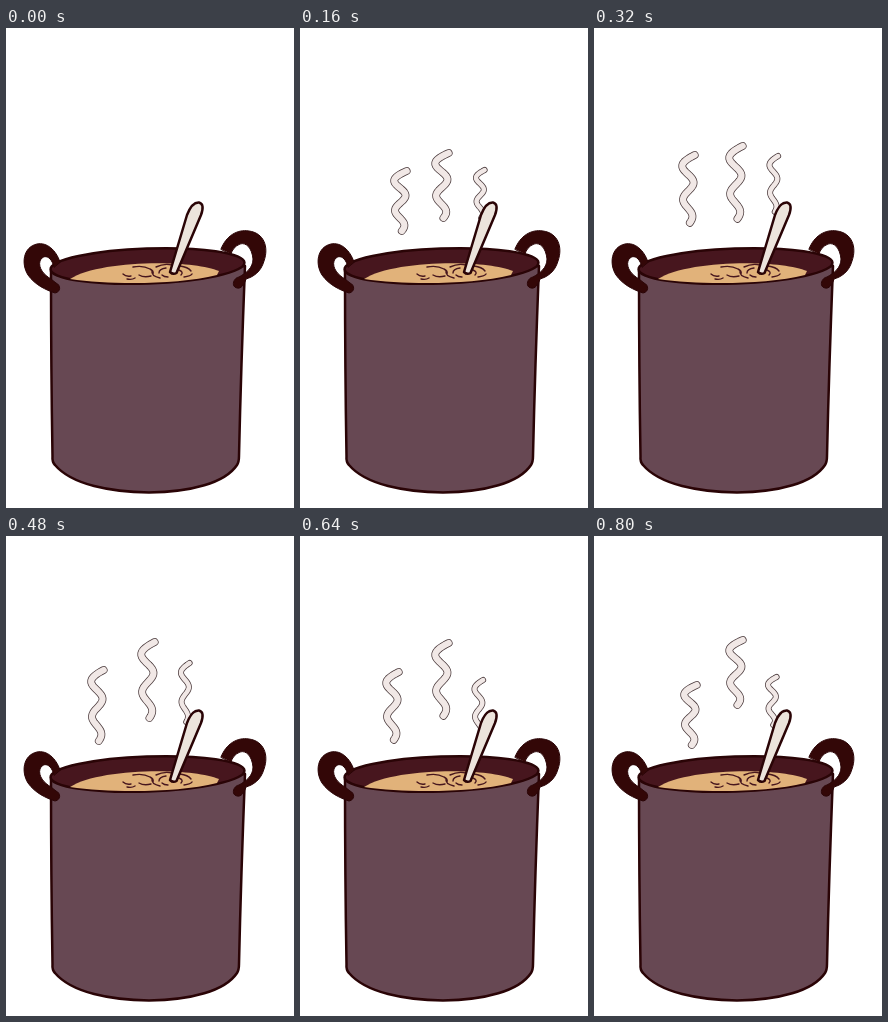
An HTML page for the animation above (0.96 s loop, 288 px wide and 480 px high).

```html
<!DOCTYPE html>
<html lang="en">
<head>
<meta charset="utf-8">
<title>Steaming pot</title>
<style>
  html, body { margin: 0; width: 100%; height: 100%; overflow: hidden; background: #fff; }
  svg { display: block; width: 100vw; height: 100vh; }
  path, ellipse { stroke-linecap: round; stroke-linejoin: round; }
  .line { stroke: #2a0406; stroke-width: 2.5; }
  .dark { fill: #330707; stroke: #2a0406; stroke-width: 1; }
  .swirl { fill: none; stroke: #47161e; stroke-width: 1.4; }
  #steam path { fill: none; }
</style>
</head>
<body>
<svg viewBox="0 0 288 480">
  <g id="steam"></g>

  <path class="line" fill="#674853" d="M45 243 Q45 340 46.500 428 Q46 434 49 437 C66 457 105 464 143 464.500 C185 464 219 455 231 437 Q233 434 233 428 Q235 340 239 238 Z"/>
  <ellipse class="line" fill="#47161e" cx="141.500" cy="238" rx="97" ry="17.500" transform="rotate(-2 141.500 238)"/>
  <path fill="#e1b27a" d="M64 251 C92 232 185 231 213 243 L211 247 C170 257 105 257 64 251 Z"/>
  <path class="swirl" d="M117 246 q3 3 8 2 M121 251 q5 1 8 -1 M127 239 q10 -2 17 2 q4 2 3 5 M133 247 q5 3 12 1
    M150 239 q8 -4 16 -2 M146 243 q-1 5 8 7 M153 245 q0 -4 7 -5 M156 247 q2 2 6 2
    M174 238 q8 1 11 5 M173 242 q5 2 2 5 M178 249 q7 -1 8 -3"/>
  <path class="dark" d="M54 234 C50 222 41 214 31 216 C17 219 15 236 22 247 C29 257 40 262 49 265 C55 264 55 257 50 255 L45 251 C38 247 32 240 34 233 C37 226 45 227 48 239 Z"/>
  <path class="dark" d="M215 221 C220 208 231 201 243 203 C258 205 263 219 258 233 C255 244 247 249 240 251 C238 257 235 261 231 260 C225 259 227 250 233 249 C240 245 247 240 247 231 C246 220 240 214 234 216 C229 218 226 222 225 226 Z"/>
  <path class="line" fill="#ece4dc" d="M164 244 L181 187 Q186 174 193 174.500 Q199 176 195 187 L170.500 245 Q167 247 164 244 Z"/>
</svg>
<script>
  const STEP = 160;
  const POSES = 6; // the first one has no steam
  const SAMPLES = 40;

  // Every wisp is the same wave; only its size, place and rise differ.
  const wisps = [
    { x: 100, sway: 7, drift: 1, length: 60, reach: 6.5, width: 7.8, tops: [143, 127, 134, 136, 149] },
    { x: 141.5, sway: 0, drift: 0, length: 65, reach: 7, width: 7.8, tops: [125, 118, 106, 107, 104] },
    { x: 180, sway: 0, drift: .5, length: 48, reach: 4.5, width: 6, tops: [142, 128, 127, 144, 141] }
  ];

  const steam = document.getElementById('steam');

  function addStroke(color, width) {
    const path = document.createElementNS('http://www.w3.org/2000/svg', 'path');
    path.setAttribute('stroke', color);
    path.setAttribute('stroke-width', width);
    return steam.appendChild(path);
  }

  for (const wisp of wisps) {
    wisp.strokes = [
      addStroke('#4a3a3c', wisp.width),
      addStroke('#f1e8e6', wisp.width - 1.5)
    ];
  }

  // Two full waves that narrow downwards, with a curl at the tip.
  function wispPath({ x, sway, drift, length, reach, tops }, age) {
    const swell = Math.sin(Math.PI * age / (tops.length - 1));
    const center = x - sway * swell - drift * age;
    const span = length + 11 * swell;
    const points = Array.from({ length: SAMPLES + 1 }, (_, i) => {
      const u = i / SAMPLES;
      const wave = reach * (1 - .35 * u) * Math.cos(Math.PI * (.36 + 4 * u));
      const curl = .6 * reach * Math.exp(-16 * u);
      return `${(center + wave + curl).toFixed(2)} ${(tops[age] + span * u).toFixed(2)}`;
    });
    return 'M' + points.join('L');
  }

  let shown = -1;

  function draw() {
    const pose = Math.floor(performance.now() / STEP) % POSES;
    if (pose !== shown) {
      shown = pose;
      for (const wisp of wisps) {
        const d = pose ? wispPath(wisp, pose - 1) : '';
        wisp.strokes.forEach(path => path.setAttribute('d', d));
      }
    }
    requestAnimationFrame(draw);
  }

  draw();
</script>
</body>
</html>
```
